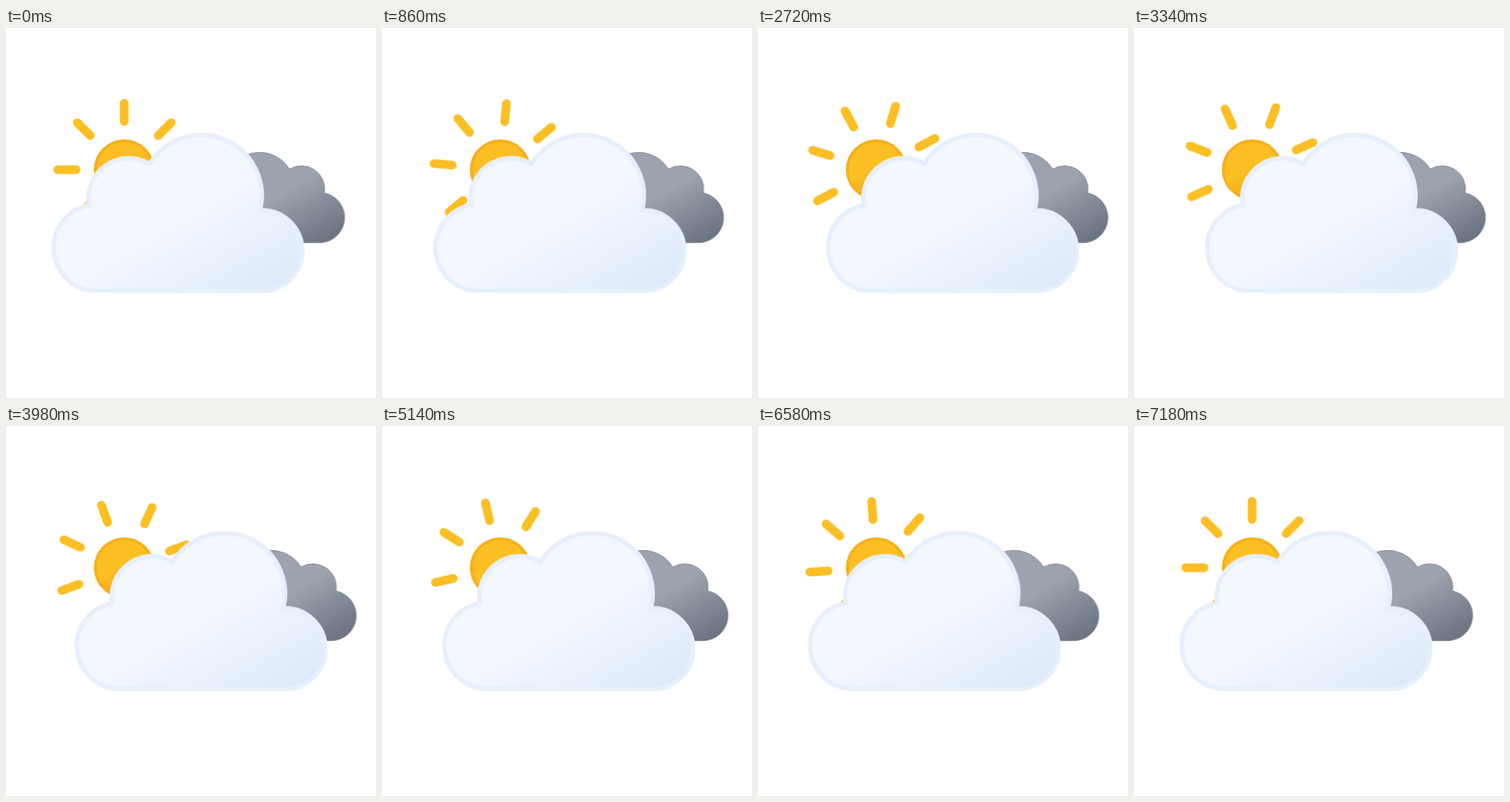
Write an HTML page without scripts that moves like this. It is 480 px wide and 480 px high and loops after 7220 ms.

```html
<!DOCTYPE html>
<html lang="en">
<head>
<meta charset="utf-8">
<title>Overcast day</title>
<style>
  html, body { margin: 0; width: 100%; height: 100%; overflow: hidden; background: #fff; }
  svg { display: block; width: 100vw; height: 100vh; }

  .rays, .drift { animation: 7220ms linear infinite; }
  .rays { animation-name: spin; }
  .drift { animation-name: drift; }
  .near { --span: 36px; }
  .far { --span: 18px; }

  @keyframes spin {
    from { transform: rotate(0deg); }
    99.723%, to { transform: rotate(45deg); }
  }
  @keyframes drift {
    0% { transform: translateX(0); animation-timing-function: cubic-bezier(.167, 0, .667, 1); }
    49.861% { transform: translateX(var(--span)); animation-timing-function: linear; }
    99.723%, to { transform: translateX(0); }
  }
</style>
</head>
<body>
<svg viewBox="0 0 512 512">
  <defs>
    <linearGradient id="sunFill" gradientUnits="userSpaceOnUse" x1="-20" y1="-34.6" x2="20" y2="34.7">
      <stop offset=".45" stop-color="#fbbf24"/>
      <stop offset="1" stop-color="#f59e0b"/>
    </linearGradient>
    <linearGradient id="farFill" gradientUnits="userSpaceOnUse" x1="52.7" y1="9.6" x2="133.4" y2="149.3">
      <stop offset=".45" stop-color="#9ca3af"/>
      <stop offset="1" stop-color="#6b7280"/>
    </linearGradient>
    <linearGradient id="nearFill" gradientUnits="userSpaceOnUse" x1="99.5" y1="30.7" x2="232.6" y2="261.4">
      <stop offset=".45" stop-color="#f3f7fe"/>
      <stop offset="1" stop-color="#deeafb"/>
    </linearGradient>
    <path id="pair" d="M0-92V-66.7M0 92V66.7"/>
  </defs>

  <g transform="translate(163.6 196)">
    <circle r="40" fill="url(#sunFill)" stroke="#f8af18" stroke-width="4"/>
    <g class="rays" stroke="#fbbf24" stroke-width="12" stroke-linecap="round">
      <use href="#pair"/>
      <use href="#pair" transform="rotate(45)"/>
      <use href="#pair" transform="rotate(90)"/>
      <use href="#pair" transform="rotate(135)"/>
    </g>
  </g>

  <g transform="translate(269.2 171.5)">
    <path class="drift far" fill="url(#farFill)" stroke="#848b98"
      d="M.5 93.2a32.4 32.4 0 0 0 32.4 32.4h129.8v-.1l2.3.1a34.8 34.8 0 0 0 6.5-68.9 32.4 32.4 0 0 0-48.5-33 48.6 48.6 0 0 0-88.6 37.1h-1.5A32.4 32.4 0 0 0 .5 93.2Z"/>
  </g>

  <g transform="translate(63 145)">
    <path class="drift near" fill="url(#nearFill)" stroke="#e6effc" stroke-width="6"
      d="M291 107l-2.5.1A83.9 83.9 0 0 0 135.6 43 56 56 0 0 0 51 91a56.6 56.6 0 0 0 .8 9A60 60 0 0 0 63 219l4-.2v.2h224a56 56 0 0 0 0-112Z"/>
  </g>
</svg>
</body>
</html>
```
